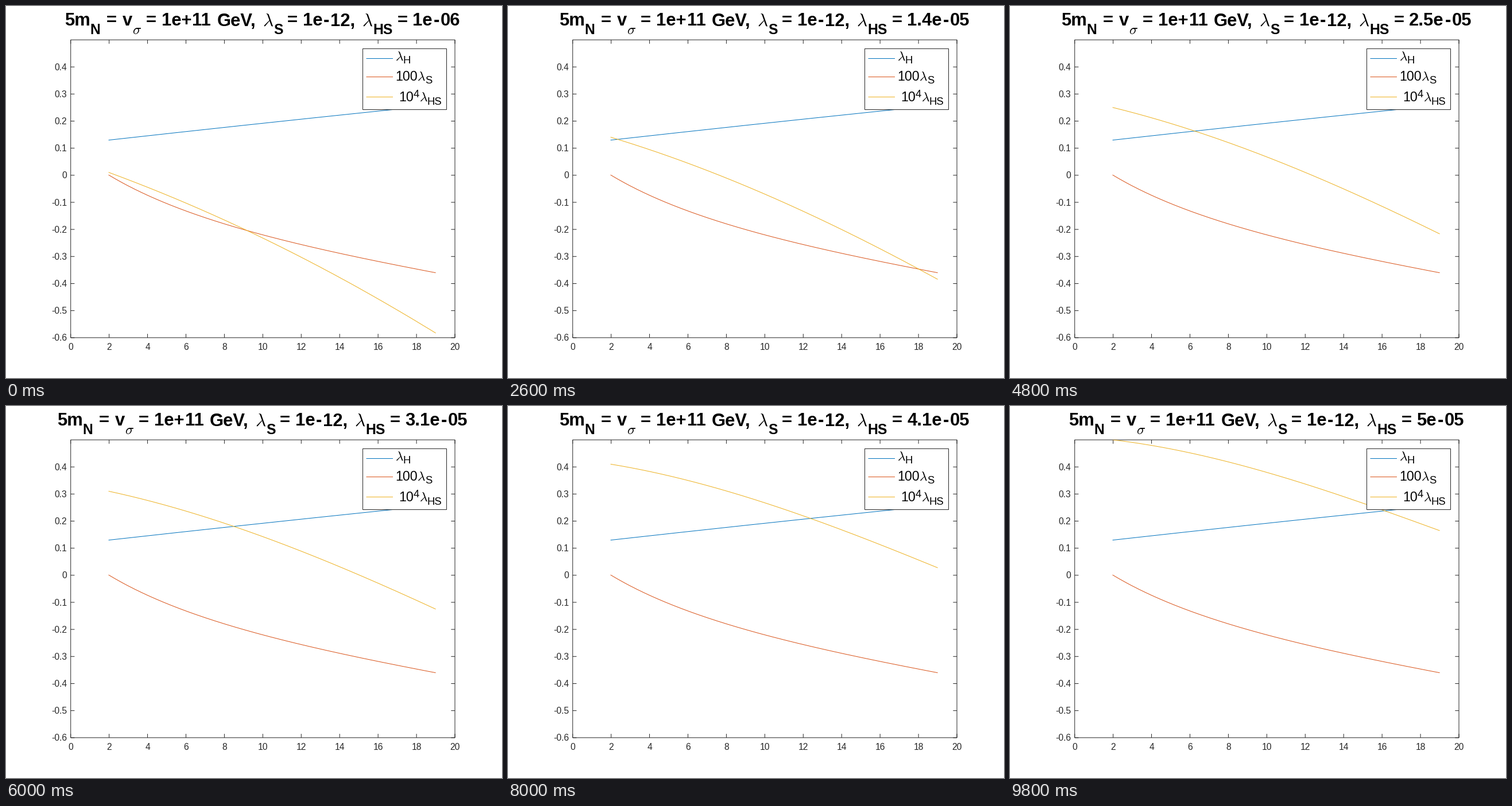
A matplotlib script for the animation above (10 s loop, 864 by 648 pixels).

```python
import numpy as np
import matplotlib.pyplot as plt
from matplotlib.animation import FuncAnimation
from matplotlib.patches import Rectangle

W, H, DPI = 864, 648, 100
PT = 72 / DPI
INK = "0.15"
BLUE, RED, YELLOW = "#0072BD", "#D95319", "#EDB120"
LEFT, RIGHT, TOP, BOTTOM = 112.7, 782.0, 59.0, 577.8
TITLE, TITLE_SUB = 31, 24.8
LEGEND, LEGEND_SUB = 23.1, 18.5
LAM, SIG = r"$\lambda$", r"$\sigma$"

plt.rcParams["font.family"] = "Liberation Sans"
plt.rcParams["mathtext.fontset"] = "cm"

fig = plt.figure(figsize=(W / DPI, H / DPI), dpi=DPI, facecolor="white")
ax = fig.add_axes([0, 0, 1, 1])
ax.set_xlim(0, W)
ax.set_ylim(H, 0)
ax.axis("off")


def px(x):
    return LEFT + (RIGHT - LEFT) * x / 20


def py(y):
    return BOTTOM - (BOTTOM - TOP) * (y + 0.6) / 1.1


def text(x, y, s, size, ha="left", bold=False, color="black"):
    return ax.text(x, y, s, fontsize=size * PT, ha=ha, va="baseline", color=color,
                   weight="bold" if bold else "normal", zorder=6)


def line(xs, ys, color, z=2):
    return ax.plot(xs, ys, color=color, lw=PT, zorder=z, snap=False,
                   solid_capstyle="butt")[0]


def box(x0, y0, x1, y1, face, z):
    ax.add_patch(Rectangle((x0, y0), x1 - x0, y1 - y0, fc=face, ec=INK, lw=PT,
                           zorder=z, snap=False))


# Axes frame, inward ticks and labels
box(LEFT, TOP, RIGHT, BOTTOM, "none", 2)
TICK = 6.7
for v in range(0, 21, 2):
    x = px(v)
    line([x, x], [BOTTOM, BOTTOM - TICK], INK)
    line([x, x], [TOP, TOP + TICK], INK)
    text(x, 598.6, str(v), 15.6, "center", color=INK)
for k in range(-6, 5):
    y = py(k / 10)
    line([LEFT, LEFT + TICK], [y, y], INK)
    line([RIGHT, RIGHT - TICK], [y, y], INK)
    text(106.3, y + 5.6, f"{k / 10:g}", 15.6, "right", color=INK)

# Running couplings
t = np.linspace(1.97, 19, 200)
u = t - 2
higgs = 0.13 + 0.0079 * u - 1.9e-5 * u**2
singlet = -u / (23.565 + 1.778 * u - 0.0228 * u**2)
portal_base = 0.01 - 0.02614 * u - 0.000514 * u**2
portal_gain = 0.01 + 0.000362 * u - 9.3e-6 * u**2 + 3.65e-7 * u**3

line(px(t), py(higgs), BLUE, 3)
line(px(t), py(singlet), RED, 3)
portal = line(px(t), py(portal_base), YELLOW, 3)
portal.set_clip_path(Rectangle((LEFT, TOP - 0.5), RIGHT - LEFT, BOTTOM - TOP + 1,
                               transform=ax.transData))

# Legend
box(621.5, 74.4, 767.5, 180.5, "white", 4)
for y, color in ((91.5, BLUE), (123.5, RED), (158.5, YELLOW)):
    line([627.5, 674], [y, y], color, 5)
for x, y, s, size in (
    (678.5, 95, LAM, LEGEND), (691.5, 100, "H", LEGEND_SUB),
    (678.5, 129.7, "100", LEGEND), (716.5, 129.7, LAM, LEGEND), (730, 135.2, "S", LEGEND_SUB),
    (684.5, 165.7, "10", LEGEND), (710, 158.8, "4", LEGEND_SUB),
    (720, 165.7, LAM, LEGEND), (733.5, 172, "HS", LEGEND_SUB),
):
    text(x, y, s, size)

# Title: words slide left, the exponent slides right when the number grows
BASE, SUB = 34.5, 48.7
words = [(x, text(x, y, s, size, bold=True)) for x, y, s, size in (
    (102, BASE, "5m", TITLE), (146.5, SUB, "N", TITLE_SUB),
    (174.5, BASE, "=", TITLE), (203, BASE, "v", TITLE), (220, SUB, SIG, TITLE_SUB),
    (243.7, BASE, "=", TITLE), (271, BASE, "1e+", TITLE), (324.5, BASE, "11", TITLE),
    (368, BASE, "GeV,", TITLE),
    (446.7, BASE, LAM, TITLE), (466, SUB, "S", TITLE_SUB),
    (490, BASE, "=", TITLE), (517, BASE, "1e", TITLE), (553, BASE, "-", TITLE),
    (565, BASE, "12,", TITLE),
    (619.7, BASE, LAM, TITLE), (639, SUB, "HS", TITLE_SUB), (681.3, BASE, "=", TITLE),
)]
mantissa = text(708, BASE, "", TITLE, bold=True)
minus = text(744.5, BASE, "-", TITLE, bold=True)
exponent = text(756.5, BASE, "", TITLE, bold=True)


def update(i):
    n = i + 1
    portal.set_ydata(py(portal_base + i * portal_gain))
    head, tail = f"{n * 1e-6:g}".split("e-")
    shift = 13 if "." in head else 0
    for x, word in words:
        word.set_x(x - shift)
    mantissa.set_text(head + "e")
    mantissa.set_x(708 - shift)
    minus.set_x(744.5 + shift)
    exponent.set_text(tail)
    exponent.set_x(756.5 + shift)
    return []


anim = FuncAnimation(fig, update, frames=50, interval=200, repeat=True,
                     repeat_delay=0, blit=False)
plt.show()
```
